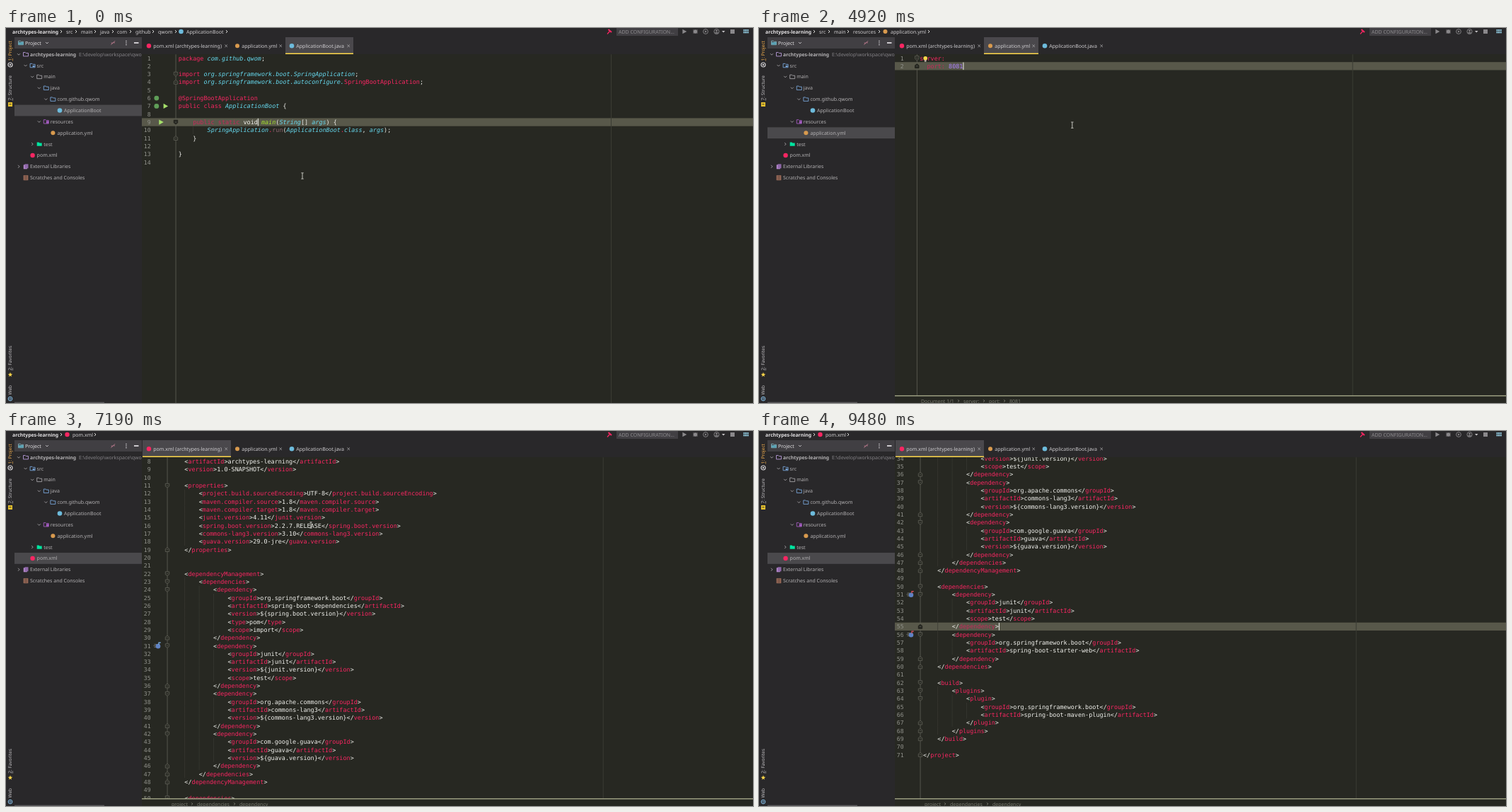
Write an HTML page with a canvas that moves like this. It is 1056 px wide and 530 px high and loops after 9580 ms.

```html
<!DOCTYPE html>
<html lang="en">
<head>
<meta charset="utf-8">
<title>Project walkthrough</title>
<style>
html, body { margin: 0; width: 100%; height: 100%; overflow: hidden; background: #272822; }
canvas { display: block; width: 1056px; height: 530px; }
</style>
</head>
<body>
<canvas id="stage"></canvas>
<script>
const W = 1056, H = 530, LOOP = 9580;
const CHAR = 5.093, LINE = 11.32, TOP = 42.5;
const UI = '"Noto Sans", "Open Sans", sans-serif';
const MONO = '"DejaVu Sans Mono", "Noto Sans Mono", monospace';
const C = {
  editor: '#272822', panel: '#29282a', head: '#413f43', row: '#4a494c', hot: '#403f43',
  caretRow: '#58584a', text: '#b4b2b4', dim: '#858387', bright: '#f0f0ec', orange: '#f5b04e',
  yellow: '#ffd84a', pink: '#f92662', cyan: '#66d9ef', green: '#a6e22e', purple: '#ae81ff',
  number: '#90918b', guide: '#45463e', blue: '#78a5d8', lime: '#a5e06a'
};
const STYLES = { w: [C.bright], p: [C.pink], c: [C.cyan, 1], g: [C.green, 1], n: [C.purple], d: ['#8c6470'] };

const JAVA = `~ppackage ~ccom.github.qwom~w;

~pimport ~corg.springframework.boot.SpringApplication~w;
~pimport ~corg.springframework.boot.autoconfigure.~pSpringBootApplication~w;

~p@SpringBootApplication
~ppublic class ~cApplicationBoot ~w{

    ~ppublic static void ~gmain~w(~cString~w[] ~cargs~w) {
        ~cSpringApplication~p.~drun~w(~cApplicationBoot~p.~cclass~w, ~cargs~w);
    }

}
`.split('\n');

const YML = ['~pserver:', '  ~pport: ~n8081'];

const XML = `<?xml version="1.0" encoding="UTF-8"?>
<project xmlns="http://maven.apache.org/POM/4.0.0"
         xmlns:xsi="http://www.w3.org/2001/XMLSchema-instance"
         xsi:schemaLocation="http://maven.apache.org/POM/4.0.0 http://maven.apache.org/xsd/maven-4.0.0.xsd">
    <modelVersion>4.0.0</modelVersion>

    <groupId>com.github.qwom</groupId>
    <artifactId>archtypes-learning</artifactId>
    <version>1.0-SNAPSHOT</version>

    <properties>
        <project.build.sourceEncoding>UTF-8</project.build.sourceEncoding>
        <maven.compiler.source>1.8</maven.compiler.source>
        <maven.compiler.target>1.8</maven.compiler.target>
        <junit.version>4.11</junit.version>
        <spring.boot.version>2.2.7.RELEASE</spring.boot.version>
        <commons-lang3.version>3.10</commons-lang3.version>
        <guava.version>29.0-jre</guava.version>
    </properties>


    <dependencyManagement>
        <dependencies>
            <dependency>
                <groupId>org.springframework.boot</groupId>
                <artifactId>spring-boot-dependencies</artifactId>
                <version>\${spring.boot.version}</version>
                <type>pom</type>
                <scope>import</scope>
            </dependency>
            <dependency>
                <groupId>junit</groupId>
                <artifactId>junit</artifactId>
                <version>\${junit.version}</version>
                <scope>test</scope>
            </dependency>
            <dependency>
                <groupId>org.apache.commons</groupId>
                <artifactId>commons-lang3</artifactId>
                <version>\${commons-lang3.version}</version>
            </dependency>
            <dependency>
                <groupId>com.google.guava</groupId>
                <artifactId>guava</artifactId>
                <version>\${guava.version}</version>
            </dependency>
        </dependencies>
    </dependencyManagement>

    <dependencies>
        <dependency>
            <groupId>junit</groupId>
            <artifactId>junit</artifactId>
            <scope>test</scope>
        </dependency>
        <dependency>
            <groupId>org.springframework.boot</groupId>
            <artifactId>spring-boot-starter-web</artifactId>
        </dependency>
    </dependencies>

    <build>
        <plugins>
            <plugin>
                <groupId>org.springframework.boot</groupId>
                <artifactId>spring-boot-maven-plugin</artifactId>
            </plugin>
        </plugins>
    </build>

</project>`.split('\n');

const markXml = s => s
  .replace(/(<[/?]?)([\w.-]+)/g, '~w$1~p$2~w')
  .replace(/ (xmlns:xsi|xmlns|xsi:schemaLocation|version|encoding)=/g, ' ~c$1~w=');
const XML_MARKED = XML.map(markXml);

const canvas = document.getElementById('stage');
const ctx = canvas.getContext('2d');
const dpr = window.devicePixelRatio || 1;
canvas.width = W * dpr;
canvas.height = H * dpr;

function rect(x, y, w, h, color) {
  ctx.fillStyle = color;
  ctx.fillRect(x, y, w, h);
}

function path(points, color, { width = 1, fill = false, close = fill } = {}) {
  ctx.beginPath();
  points.forEach(([x, y], i) => i ? ctx.lineTo(x, y) : ctx.moveTo(x, y));
  if (close) ctx.closePath();
  if (fill) { ctx.fillStyle = color; ctx.fill(); }
  else { ctx.strokeStyle = color; ctx.lineWidth = width; ctx.stroke(); }
}

function dot(x, y, r, color, ring) {
  ctx.beginPath();
  ctx.arc(x, y, r, 0, 7);
  if (ring) { ctx.strokeStyle = color; ctx.lineWidth = ring; ctx.stroke(); }
  else { ctx.fillStyle = color; ctx.fill(); }
}

function label(s, x, mid, color = C.text, weight = 400, size = 7) {
  ctx.font = `${weight} ${size}px ${UI}`;
  ctx.fillStyle = color;
  ctx.fillText(s, x, mid + 2.5);
}

function chevron(x, y, dir, color = C.text, r = 2) {
  path(dir === 'down' ? [[x - r, y - r / 2], [x, y + r / 2], [x + r, y - r / 2]]
    : [[x - r / 2, y - r], [x + r / 2, y], [x - r / 2, y + r]], color, { width: 0.9 });
}

function folder(x, y, color, fill) {
  path([[x - 3.5, y - 2.7], [x - 0.7, y - 2.7], [x + 0.3, y - 1.7], [x + 3.5, y - 1.7],
    [x + 3.5, y + 2.7], [x - 3.5, y + 2.7]], color, { fill, close: true, width: 0.9 });
}

const play = (x, y, color, s = 3.6) =>
  path([[x - s * 0.8, y - s], [x + s, y], [x - s * 0.8, y + s]], color, { fill: true });

const ICONS = {
  root: (x, y) => folder(x, y, '#b79ad8'),
  dir: (x, y) => folder(x, y, '#a5a3a6'),
  src: (x, y) => { folder(x, y, C.blue); rect(x, y, 3, 2, C.blue); },
  pkg: (x, y) => folder(x, y, C.blue),
  res: (x, y) => { folder(x, y, '#a35cc0'); rect(x, y - 1, 3.5, 3.5, '#a35cc0'); },
  test: (x, y) => folder(x, y, '#00e5a0', true),
  java: (x, y) => dot(x, y, 3.3, '#6dbbdc'),
  yml: (x, y) => dot(x, y, 3, '#d89a4e'),
  pom: (x, y) => dot(x, y, 3.2, C.pink),
  lib: (x, y) => { rect(x - 3.2, y - 2.5, 5, 6, '#b98bd0'); rect(x - 1.5, y - 3.5, 5, 6, '#8f68aa'); },
  note: (x, y) => {
    rect(x - 3.3, y - 3.5, 6.6, 7, '#a5705c');
    for (let i = -2; i < 3; i += 2) rect(x - 2.2, y + i - 0.3, 4.4, 0.7, '#3b302c');
  }
};

// indent level, icon, name, chevron direction
const TREE = [
  [0, 'root', 'archtypes-learning', 'down'], [1, 'src', 'src', 'down'], [2, 'dir', 'main', 'down'],
  [3, 'pkg', 'java', 'down'], [4, 'pkg', 'com.github.qwom', 'down'], [5, 'java', 'ApplicationBoot'],
  [3, 'res', 'resources', 'down'], [4, 'yml', 'application.yml'], [2, 'test', 'test', 'right'],
  [1, 'pom', 'pom.xml'], [0, 'lib', 'External Libraries', 'right'], [0, 'note', 'Scratches and Consoles']
];

// name, text x, chevron x, icon
const CRUMB_HEAD = [['src', 85, 99], ['main', 106, 126]];
const CRUMBS = {
  java: [...CRUMB_HEAD, ['java', 133, 151], ['com', 157, 176], ['github', 183, 208],
    ['qwom', 215, 240], ['ApplicationBoot', 255, 312, 'java']],
  yml: [...CRUMB_HEAD, ['resources', 133, 170], ['application.yml', 186, 240, 'yml']],
  pom: [['pom.xml', 94, 126, 'pom']]
};

const TABS = [
  ['pom', 'pom.xml (archtypes-learning)', 193, 318],
  ['yml', 'application.yml', 318, 395],
  ['java', 'ApplicationBoot.java', 395, 491]
];

function topBar(crumb) {
  label('archtypes-learning', 9, 5, '#e4e2e4', 700, 6.9);
  chevron(78, 5, 'right', C.bright);
  for (const [name, x, end, icon] of CRUMBS[crumb]) {
    if (icon) ICONS[icon](x - 7.5, 5);
    label(name, x, 5, '#d0ced0');
    chevron(end, 5, 'right', C.bright);
  }
  path([[850, 8.5], [854, 4]], C.pink, { width: 1.2 });
  path([[851.5, 2], [856, 6]], C.pink, { width: 2 });
  rect(863, 0, 87, 11, C.head);
  label('ADD CONFIGURATION...', 866, 5, '#8f8d90');
  const gray = '#8a888b';
  play(959, 5, gray, 3.3);
  dot(974.5, 5, 2.6, gray);
  for (const d of [-2, 0, 2]) path([[971, 5 + d], [978, 5 + d]], gray, { width: 0.7 });
  dot(989, 5, 3.4, gray, 0.9);
  play(989.3, 5, gray, 1.6);
  dot(1004.5, 5, 3.6, gray, 0.9);
  dot(1004.5, 4, 1.3, gray);
  rect(1002.5, 6, 4, 1.6, gray);
  path([[1012, 4], [1016.5, 4], [1014.2, 6.5]], '#c8c6c9', { fill: true });
  rect(1024, 2, 6, 6, gray);
  for (let i = 0; i < 6; i++) rect(1042.5 + i % 3 * 2.6, 2 + (i / 3 | 0) * 3, 2, 2.4, '#8fc7dc');
}

function sideLabel(s, bottom, color, underline = true) {
  ctx.save();
  ctx.translate(8.3, bottom);
  ctx.rotate(-Math.PI / 2);
  label(s, 0, -2.5, color, 400, 6.5);
  if (underline) rect(0, 1, 3.5, 0.6, color);
  ctx.restore();
}

function sideStrip() {
  sideLabel('1: Project', 46.5, C.orange);
  dot(6, 52, 3, '#d5d3d6', 1.2);
  dot(6, 52, 1.2, '#d5d3d6');
  sideLabel('7: Structure', 102.5, '#c2c0c3');
  rect(3, 105, 6, 6, '#e5c02e');
  rect(4.5, 107.3, 3, 0.9, '#29282a');
  sideLabel('2: Favorites', 484, '#c2c0c3');
  const star = [];
  for (let i = 0; i < 10; i++) {
    const r = i % 2 ? 1.4 : 3.4, a = i * Math.PI / 5;
    star.push([6 + r * Math.sin(a), 490 - r * Math.cos(a)]);
  }
  path(star, C.yellow, { fill: true });
  sideLabel('Web', 518.5, '#c2c0c3', false);
  dot(6, 524, 2.9, '#7fb3d8', 1);
  path([[3, 524], [9, 524]], '#7fb3d8', { width: 0.7 });
  path([[6, 521], [6, 527]], '#7fb3d8', { width: 0.7 });
}

function projectPanel(selected, hot) {
  rect(12, 13, 180, 16, C.head);
  folder(21, 21, '#7fb0bd');
  rect(18, 20, 6.5, 3.5, '#5aa2b4');
  label('Project', 27, 21, '#e0dee1');
  chevron(58, 21, 'down', '#c8c6c9');
  path([[148.5, 23.7], [151, 21.2], [148.7, 21.2]], '#d98aa0', { width: 0.8 });
  path([[154, 18.3], [151.5, 20.8], [153.8, 20.8]], '#d98aa0', { width: 0.8 });
  for (const d of [-2.6, 0, 2.6]) rect(169.3, 20.4 + d, 1.3, 1.3, '#dcdadd');
  rect(181, 20.2, 6.5, 1.6, '#eeecef');

  ctx.save();
  ctx.beginPath();
  ctx.rect(12, 29, 180, 501);
  ctx.clip();
  TREE.forEach(([level, icon, name, dir], i) => {
    const y = 37.2 + i * 15.86, x = 28 + level * 9.6;
    const on = icon === selected && !dir;
    if (on) {
      rect(12, y - 7.9, 180, 15.8, hot ? C.hot : C.row);
      if (hot) rect(12, y - 7.9, 1.2, 15.8, C.orange);
    }
    if (dir) chevron(x - 10, y, dir, '#a5a3a6');
    ICONS[icon](x, y);
    label(name, x + 6, y, on && hot ? C.orange : C.text, i ? 400 : 700, i ? 7 : 6.9);
    if (!i) label('E:\\develop\\workspace\\qwom', 103, y, C.dim);
  });
  ctx.restore();
  rect(12, 528.7, 127, 1.3, '#5b595c');
}

function tabBar(active) {
  for (const [icon, name, x, end] of TABS) {
    if (icon === active) {
      rect(x, 13, end - x, 24, '#4a484c');
      rect(x, 35.5, end - x, 1.7, C.yellow);
    }
    ICONS[icon](x + 9, 25.3);
    label(name, x + 15.3, 25.3, '#d0ced1');
    const cx = end - 6.8;
    path([[cx - 1.8, 23.5], [cx + 1.8, 27.1]], '#a9a7aa', { width: 0.8 });
    path([[cx + 1.8, 23.5], [cx - 1.8, 27.1]], '#a9a7aa', { width: 0.8 });
  }
}

function codeLine(marked, x, mid, dimmed) {
  const parts = ('~w' + marked).split(/~(.)/);
  let col = 0;
  for (let i = 1; i < parts.length; i += 2) {
    const [color, italic] = STYLES[parts[i]], s = parts[i + 1];
    ctx.font = `${italic ? 'italic ' : ''}8.46px ${MONO}`;
    ctx.fillStyle = dimmed && color === C.pink ? '#c8295a' : color;
    ctx.fillText(s, x + col * CHAR, mid + 3);
    col += s.length;
  }
}

function foldMark(x, y, up, solid) {
  const s = up ? -1 : 1;
  path([[x - 2.7, y - 2.8 * s], [x + 2.7, y - 2.8 * s], [x + 2.7, y + 1 * s], [x, y + 3 * s], [x - 2.7, y + 1 * s]],
    C.editor, { fill: true });
  path([[x - 2.7, y - 2.8 * s], [x + 2.7, y - 2.8 * s], [x + 2.7, y + 1 * s], [x, y + 3 * s], [x - 2.7, y + 1 * s]],
    solid ? '#1d1e19' : '#62635a', { width: 0.8, close: true });
  path([[x - 1.3, y], [x + 1.3, y]], '#62635a', { width: 0.7 });
}

function editor({ lines, x, gutter, margin, row, col, caret, scroll = 0, crumbs, folds, extras }) {
  const bottom = crumbs ? 519.5 : H, mid = n => TOP + (n - 1) * LINE - scroll;
  rect(192, 37, W - 192, H - 37, C.editor);
  ctx.save();
  ctx.beginPath();
  ctx.rect(192, 37.3, W - 192, bottom - 37.3);
  ctx.clip();
  rect(192, mid(row) - LINE / 2, W - 192, LINE, C.caretRow);
  rect(margin, 37, 1, H, '#3b3c34');
  rect(gutter - 0.4, 37, 0.9, H, '#5a5b52');
  lines.forEach((s, i) => {
    const y = mid(i + 1);
    if (y < 28 || y > 540) return;
    const depth = s.match(/^ */)[0].length / 4 | 0;
    if (crumbs || depth > 1) {
      for (let k = 1; k < depth; k++) rect(x + k * 4 * CHAR, y - LINE / 2, 0.7, LINE, '#393a33');
    }
    ctx.font = `8.2px ${MONO}`;
    ctx.fillStyle = C.number;
    ctx.textAlign = 'right';
    ctx.fillText(i + 1, 204.6, y + 3);
    ctx.textAlign = 'left';
    codeLine(s, x, y, i + 1 === row);
    const fold = folds(i);
    if (fold) foldMark(gutter, y, fold < 0, i + 1 === row);
  });
  if (extras) extras(mid);
  if (caret) rect(x + col * CHAR, mid(row) - 5.3, 1, 10.6, C.bright);
  ctx.restore();
  if (crumbs) {
    rect(192, 519.3, W - 192, 1.1, '#c3c6a2');
    crumbs.forEach(([name, cx], i) => {
      if (i) chevron(cx - 7, 527, 'right', '#8b8c80', 1.6);
      label(name, cx, 527, '#77786e');
    });
  }
}

const openTag = s => /^ *<[\w]/.test(s) && !s.includes('</');
const xmlFold = i => openTag(XML[i]) ? 1 : /^ *<\//.test(XML[i]) ? -1 : 0;

function javaMarks(mid) {
  for (const n of [6, 7]) dot(212.8, mid(n), 3.4, '#5f9e58');
  play(225.5, mid(7), C.lime);
  play(219.2, mid(9), C.lime);
}

function pomMarks(mid) {
  for (const n of [31, 51, 56]) {
    const y = mid(n);
    for (const d of [-2, 0, 2]) rect(208.5 + Math.abs(d) / 2, y + d - 0.4, 4, 0.7, '#8d8e86');
    dot(215, y + 0.6, 3.3, '#5f82c4');
    path([[216, y - 1.5], [216, y - 4.5], [218.8, y - 4.5]], n === 31 ? '#7db2e8' : '#e2505c', { width: 1.2 });
  }
}

function bulb(mid) {
  dot(235.2, mid(1) + 0.2, 2.8, C.yellow);
  rect(233.9, mid(1) + 2.8, 2.6, 2.4, '#b9b9ae');
}

function arrow(x, y) {
  const p = [[0, 0], [0, 8.2], [1.9, 6.5], [3.2, 9.4], [4.4, 8.9], [3.2, 6], [5.8, 6]].map(([a, b]) => [x + a, y + b]);
  path(p, '#ffffff', { fill: true });
  path(p, '#111111', { width: 0.5, close: true });
}

function ibeam(x, y) {
  path([[x, y - 4], [x, y + 4]], '#d8d8d2', { width: 0.9 });
  for (const d of [-4.2, 4.2]) path([[x - 1.7, y + d], [x + 1.7, y + d]], '#d8d8d2', { width: 0.8 });
}

// stepped progress from a to b, eased at both ends
function steps(t, a, b, n) {
  if (t < a) return 0;
  const k = Math.min(1, (Math.floor((t - a) / (b - a) * n + 1e-6) + 1) / (n + 1));
  return k * k * (3 - 2 * k);
}

const SPOTS = [[419, 209], [110, 149], [465, 135], [65, 175], [431, 133], [1042, 524]];
const MOVES = [[150, 940, 6], [3860, 4640, 6], [4920, 5740, 6], [6270, 6550, 2], [8550, 9210, 5]];

function pointer(t) {
  if (t >= 9210) return;
  let [x, y] = SPOTS[0];
  MOVES.forEach(([a, b, n], i) => {
    const k = steps(t, a, b, n), [px, py] = SPOTS[i], [qx, qy] = SPOTS[i + 1];
    if (k) { x = px + (qx - px) * k; y = py + (qy - py) * k; }
  });
  (x < 192 ? arrow : ibeam)(x, y);
}

const TICKS = [6950, 7070, 7190, 7310, 7430, 7610, 7730, 7850, 7970, 8120, 8270];

function scrollAt(t) {
  const at = TICKS.filter(v => v <= t).pop();
  if (!at) return 0;
  if (at <= 7610) return 7 + (at - 6950) / 660 * 196.8;
  return 203.8 + (at - 7610) / 660 * 173.6;
}

const blink = (t, from) => ((t - from) % 1000 + 1000) % 1000 < 500;

function draw(t) {
  const view = t < 3710 ? 'java' : t < 6130 ? 'yml' : 'pom';
  const selected = t < 1220 ? 'java' : t < 5760 ? 'yml' : 'pom';
  const hot = selected !== 'java' && selected !== view;
  const crumb = t < 1620 ? 'java' : view === 'pom' ? 'pom' : 'yml';
  ctx.setTransform(dpr, 0, 0, dpr, 0, 0);
  ctx.textRendering = 'geometricPrecision';
  rect(0, 0, W, H, C.panel);
  topBar(crumb);
  sideStrip();
  projectPanel(selected, hot);
  tabBar(view);

  if (view === 'java') {
    const start = t < 150;
    const lines = start ? JAVA.map(s => s.replace('static void', 'static ~wvoid')) : JAVA;
    editor({
      lines, x: 243.8, gutter: 240, margin: 855, row: start ? 9 : 14, col: start ? 22 : 0,
      caret: t < 1220 && (start || blink(t, 150)),
      folds: i => ({ 2: 1, 3: -1, 8: 1, 10: -1 })[i] || 0, extras: javaMarks
    });
  } else if (view === 'yml') {
    editor({
      lines: YML, x: 227.3, gutter: 223.3, margin: 838.7, row: 2, col: 12,
      caret: t < 5760 && blink(t, 3640), folds: i => i ? -1 : 1,
      crumbs: [['Document 1/1', 229], ['server:', 289], ['port:', 325], ['8081', 354]],
      extras: t >= 4920 && bulb
    });
  } else {
    editor({
      lines: XML_MARKED, x: 232, gutter: 228, margin: 843.7, row: 55, col: 21,
      caret: blink(t, 9480), scroll: scrollAt(t), folds: xmlFold,
      crumbs: [['project', 234], ['dependencies', 270], ['dependency', 330]], extras: pomMarks
    });
  }
  pointer(t);
}

const began = performance.now();
function tick() {
  draw((performance.now() - began) % LOOP);
  requestAnimationFrame(tick);
}
tick();
</script>
</body>
</html>
```
